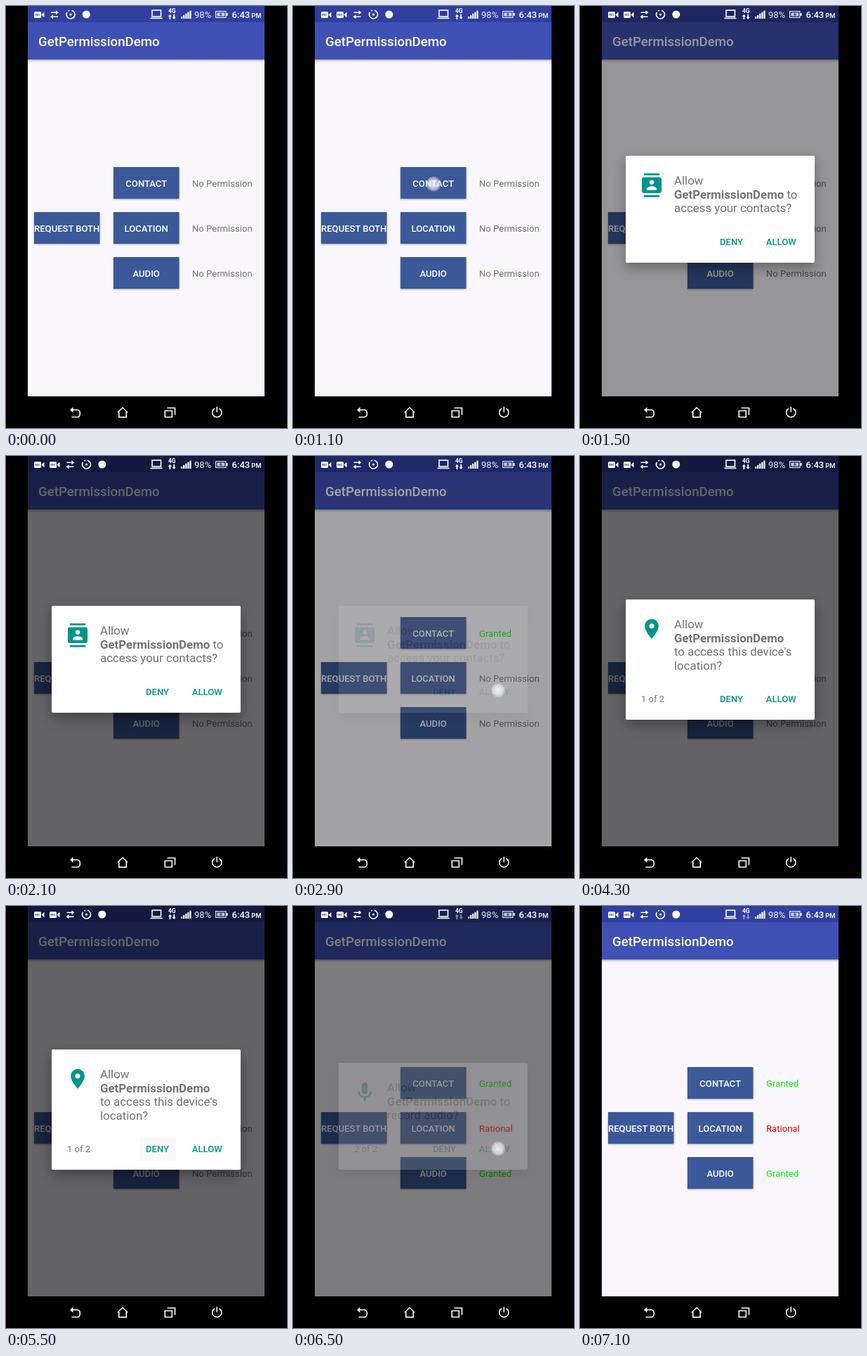
An HTML page that plays this animation: 400 px wide and 600 px high, repeating every 8000 ms.

```html
<!DOCTYPE html>
<html lang="en">
<head>
<meta charset="utf-8">
<title>Permission demo</title>
<style>
html, body { margin: 0; width: 100%; height: 100%; overflow: hidden; background: #000; }
svg { display: block; width: 400px; height: 600px; font-family: Roboto, "Noto Sans", sans-serif; }
.label { font-size: 13.1px; font-weight: 500; fill: #fff; text-anchor: middle; }
.status { font-size: 13.1px; }
.msg { font-size: 16.85px; fill: #737373; }
.action { font-size: 13.1px; font-weight: 500; fill: #009688; text-anchor: middle; }
.btn { fill: #3b5998; filter: drop-shadow(0 1px 1px rgba(0,0,0,.35)); }
.line { fill: none; stroke: #fff; stroke-width: 1.6; }
.white { fill: #fff; }
#card { filter: drop-shadow(0 7px 9px rgba(0,0,0,.32)); }
</style>
</head>
<body>
<svg viewBox="0 0 400 600">
  <defs>
    <clipPath id="cardClip"><rect id="clipRect" x="65" width="269"/></clipPath>
    <clipPath id="screen"><rect x="31" width="337" height="555"/></clipPath>
    <linearGradient id="shade" x2="0" y2="1">
      <stop stop-color="#000" stop-opacity=".28"/><stop offset="1" stop-color="#000" stop-opacity="0"/>
    </linearGradient>
    <radialGradient id="glow">
      <stop stop-color="#fff" stop-opacity=".85"/>
      <stop offset=".6" stop-color="#f2f0fa" stop-opacity=".7"/>
      <stop offset=".85" stop-color="#d8d6e6" stop-opacity=".5"/>
      <stop offset="1" stop-color="#aaa8bb" stop-opacity=".15"/>
    </radialGradient>
    <g id="cam">
      <rect x="40" y="8" width="10" height="9" rx="1.5" class="white"/>
      <path d="M50.5 12.5L54.5 8.5V16.5Z" class="white"/>
      <text x="45" y="14" font-size="4" font-weight="700" text-anchor="middle" fill="#303f9f">REC</text>
    </g>
  </defs>
  <rect width="400" height="600"/>
  <g clip-path="url(#screen)">
    <rect x="31" width="337" height="555" fill="#f9f7fb"/>
    <rect x="31" y="76" width="337" height="4" fill="url(#shade)"/>
    <rect x="31" y="23" width="337" height="53" fill="#3f51b5"/>
    <rect x="31" width="337" height="23" fill="#303f9f"/>
    <text x="46" y="57" font-size="18.7" font-weight="500" class="white">GetPermissionDemo</text>
    <g id="buttons"></g>
    <g id="results"></g>
    <rect id="dim" x="31" width="337" height="555"/>
    <g id="dialog">
      <rect id="card" x="65" width="269" rx="2" fill="#fff"/>
      <g clip-path="url(#cardClip)"><g id="content">
        <path id="icon" fill="#009688" fill-rule="evenodd"/>
        <g id="message"></g>
      </g></g>
      <g id="actions">
        <rect id="press" x="190" y="-47" width="52" height="34" rx="2"/>
        <text id="count" x="87" y="-25.3" class="status" fill="#737373"></text>
        <text x="215.5" y="-24.7" class="action">DENY</text>
        <text x="286.3" y="-24.7" class="action">ALLOW</text>
      </g>
    </g>
  </g>

  <g id="bar">
    <use href="#cam"/>
    <use id="cam2" href="#cam" x="22"/>
    <g id="notes">
      <path class="line" stroke-width="1.5" d="M64 9.3H72M66 15.2H74"/>
      <path class="white" d="M71 6.3L75 9.3L71 12.3ZM67 12.2L63 15.2L67 18.2Z"/>
      <path class="line" stroke-width="1.4" d="M93.5 6.2A6 6 0 1 1 87 8.7M90.5 6.2A6 6 0 0 0 88.6 7.1"/>
      <circle cx="92" cy="12" r="1.6" class="white"/>
      <circle cx="114.3" cy="12" r="5.5" class="white"/>
    </g>
    <rect x="208" y="6" width="12.5" height="9" class="line" stroke-width="1.3"/>
    <path class="line" d="M205.5 17.4H222.5"/>
    <text x="236.3" y="10" font-size="8.5" font-weight="700" text-anchor="middle" class="white">4G</text>
    <path id="traffic" class="white" d="M233.4 11.8L236 15H234.3V19H232.5V15H230.8ZM239.2 19L236.6 15.8H238.3V11.8H240.1V15.8H241.8Z"/>
    <g id="signal"></g>
    <text x="268" y="17" font-size="13.1" class="white" opacity=".92">98%</text>
    <rect x="298.6" y="7.6" width="14.4" height="8.8" class="line" style="stroke-width:1"/>
    <rect x="300.4" y="9.4" width="10.8" height="5.2" class="white" opacity=".75"/>
    <rect x="313.5" y="10" width="2" height="4" class="white"/>
    <path d="M306.8 8.5L303.5 12.6H305.7L304.8 15.6L308.4 11.4H306.1Z" fill="#303f9f"/>
    <text x="321.5" y="17" font-size="13.1" font-weight="500" class="white">6:43</text>
    <text x="349.3" y="17" font-size="9.4" font-weight="500" class="white">PM</text>
  </g>

  <g class="line">
    <path d="M94 574.2H102A3.9 5.2 0 0 1 102 584.5H93.5"/>
    <path d="M95.5 570.2L91 574.2L95.5 578.2Z" fill="#fff" stroke="none"/>
    <path d="M158.8 578L166 571L173.2 578M160.8 576.5V584.6H171.2V576.5"/>
    <path d="M226.3 575.5H236.3V584.5H226.3ZM229.5 571.5H240.5V581.5"/>
    <path d="M297 572.2A6.6 6.6 0 1 0 303.6 572.2M300.3 569.8V577.5"/>
  </g>
  <circle id="touch" r="11" fill="url(#glow)"/>
</svg>
<script>
const LOOP = 8000, STEP = 100;
const $ = id => document.getElementById(id);

function add(parent, tag, attrs, text = '') {
  const el = document.createElementNS('http://www.w3.org/2000/svg', tag);
  set(el, attrs);
  el.textContent = text;
  return parent.appendChild(el);
}

function set(el, attrs) {
  for (const name in attrs) el.setAttribute(name, attrs[name]);
}

// Linear interpolation through [time, value] pairs
function track(t, keys) {
  if (t <= keys[0][0]) return keys[0][1];
  for (let i = 1; i < keys.length; i++) {
    const [a, from] = keys[i - 1], [b, to] = keys[i];
    if (t <= b) return from + (to - from) * (t - a) / (b - a);
  }
  return keys[keys.length - 1][1];
}

function addButton(x, y, label) {
  add($('buttons'), 'rect', { x, y, width: 93.5, height: 45, class: 'btn' });
  add($('buttons'), 'text', { x: x + 46.7, y: y + 28, class: 'label' }, label);
}
addButton(153, 229, 'CONTACT');
addButton(40, 293, 'REQUEST BOTH');
addButton(153, 293, 'LOCATION');
addButton(153, 357, 'AUDIO');

const results = [257, 321, 385].map(y => add($('results'), 'text', { x: 265, y, class: 'status' }));
for (let i = 0; i < 5; i++) {
  const height = 3 + i * 2.1;
  add($('signal'), 'rect', { x: 249 + i * 3.1, y: 18 - height, width: 2.2, height, class: 'white' });
}

const APP = 'GetPermissionDemo';
const pages = [
  {
    lines: ['Allow', [APP, ' to'], 'access your contacts?'], count: '',
    icon: 'M20 0H4v2h16V0zM4 24h16v-2H4v2zM20 4H4c-1.1 0-2 .9-2 2v12c0 1.1.9 2 2 2h16c1.1 0 2-.9 2-2V6c0-1.1-.9-2-2-2zm-8 2.75a2.25 2.25 0 1 1 0 4.5a2.25 2.25 0 1 1 0-4.5zM17 17H7v-1.5c0-1.67 3.33-2.5 5-2.5s5 .83 5 2.5V17z'
  },
  {
    lines: ['Allow', [APP, ''], "to access this device's", 'location?'], count: '1 of 2',
    icon: 'M12 2C8.13 2 5 5.13 5 9c0 5.25 7 13 7 13s7-7.75 7-13c0-3.87-3.13-7-7-7zm0 4.5a2.5 2.5 0 1 1 0 5a2.5 2.5 0 1 1 0-5z'
  },
  {
    lines: ['Allow', [APP, ' to'], 'record audio?'], count: '2 of 2',
    icon: 'M12 14c1.66 0 3-1.34 3-3V5c0-1.66-1.34-3-3-3S9 3.34 9 5v6c0 1.66 1.34 3 3 3zm5.3-3c0 3-2.54 5.1-5.3 5.1S6.7 14 6.7 11H5c0 3.41 2.72 6.23 6 6.72V21h2v-3.28c3.28-.48 6-3.3 6-6.72h-1.7z'
  }
];

// start, end, x, y
const touches = [
  [1100, 1300, 200, 253],
  [2700, 3000, 292, 333],
  [3900, 4100, 111, 317],
  [5000, 5300, 216, 345],
  [6400, 6600, 292, 345]
];
const dimKeys = [
  [1100, 0], [1300, .1], [1500, .4], [1600, .6], [2700, .6], [2900, .35], [3100, 0],
  [3900, 0], [4300, .6], [6400, .6], [6500, .5], [6700, 0]
];
const fadeKeys = [
  [1200, 0], [1400, 1], [2700, 1], [2900, .1], [3000, 0],
  [4000, 0], [4200, 1], [6400, 1], [6500, .17], [6600, 0]
];
const pressKeys = [[4900, 0], [5100, .12], [5300, .12], [5500, .025], [5600, 0]];

let shown = null;
function showPage(page) {
  if (page === shown) return;
  shown = page;
  $('icon').setAttribute('d', page.icon);
  $('count').textContent = page.count;
  $('message').textContent = '';
  page.lines.forEach((line, i) => {
    const bold = Array.isArray(line);
    const text = add($('message'), 'text', { x: 134, y: 40.8 + i * 19.7, class: 'msg' }, bold ? '' : line);
    if (bold) {
      add(text, 'tspan', { 'font-weight': 700 }, line[0]);
      add(text, 'tspan', {}, line[1]);
    }
  });
}

function showResult(i, text, color) {
  results[i].textContent = text;
  results[i].setAttribute('fill', color);
}

function draw(t) {
  const granted = ['Granted', '#00f000'], none = ['No Permission', '#757575'];
  showResult(0, ...(t >= 2800 ? granted : none));
  showResult(1, ...(t >= 6500 ? ['Rational', '#f00000'] : none));
  showResult(2, ...(t >= 6500 ? granted : none));

  set($('cam2'), { opacity: t >= 100 ? 1 : 0 });
  set($('notes'), { transform: `translate(${t >= 100 ? 22.5 : 0} 0)` });
  set($('traffic'), { opacity: t >= 6400 ? .5 : 1 });
  set($('dim'), { opacity: track(t, dimKeys) });
  set($('dialog'), { opacity: track(t, fadeKeys) });

  const first = t < 3500;
  showPage(pages[first ? 0 : t < 5700 ? 1 : 2]);
  const top = first ? 213 : track(t, [[5500, 204], [5800, 223]]);
  const bottom = first ? 365 : 375;
  const slide = t < 5700
    ? track(t, [[5500, 0], [5600, -150]])
    : track(t, [[5700, 90], [5800, 10], [5900, 0]]);
  const box = { y: top, height: bottom - top };
  set($('card'), box);
  set($('clipRect'), box);
  set($('content'), { transform: `translate(${slide} ${top})` });
  set($('icon'), { transform: 'translate(85.2 25) scale(1.404)' });
  set($('actions'), { transform: `translate(0 ${bottom})` });
  set($('press'), { opacity: track(t, pressKeys) });

  const touch = touches.find(([from, to]) => t >= from && t < to);
  set($('touch'), touch ? { cx: touch[2], cy: touch[3], opacity: 1 } : { opacity: 0 });
}

const start = performance.now();
function tick() {
  const t = (performance.now() - start) % LOOP;
  draw(Math.floor(t / STEP) * STEP);
  requestAnimationFrame(tick);
}
tick();
</script>
</body>
</html>
```
